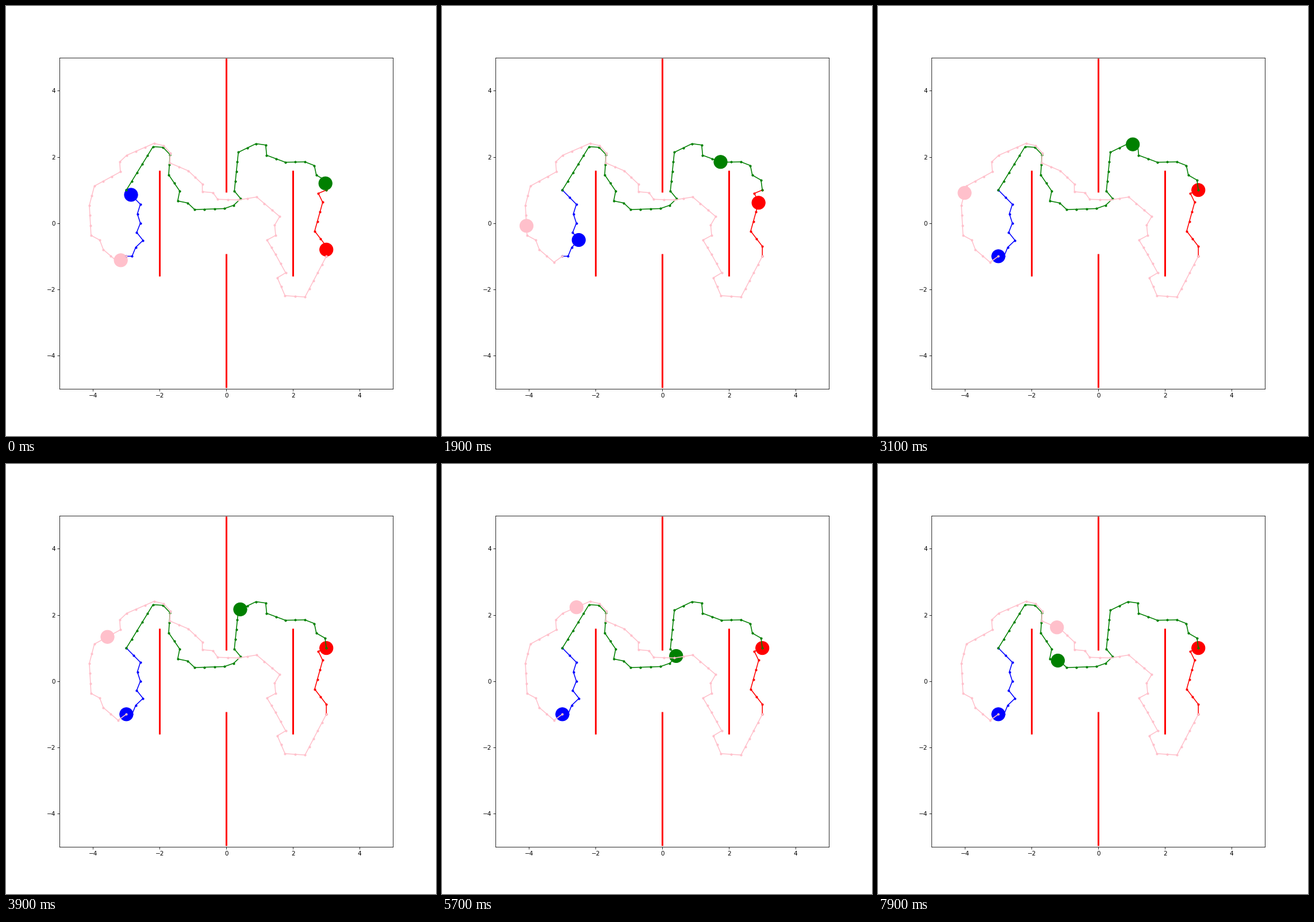
Recreate the animation shown at these times as a matplotlib script. Size 748 by 748 pixels, loop 8000 ms.

```python
import numpy as np
import matplotlib.pyplot as plt
from matplotlib.animation import FuncAnimation
from matplotlib.patches import Circle

INCHES, DPI = 10, 74.8
FRAMES, INTERVAL = 80, 100
STEP = .3    # spacing of waypoints along a route
START = .67  # progress at time zero, in waypoints

# Corners of each route; the straight legs are filled in by waypoints().
BLUE = [(-3, 1), (-2.58, .57), (-2.67, .28), (-2.58, 0), (-2.69, -.28),
        (-2.5, -.52), (-2.72, -.73), (-2.83, -1), (-3, -1)]

RED = [(3, -1), (3, -.7), (2.65, -.24), (2.89, .63), (2.76, .9), (3, 1)]

GREEN = [(3, 1), (2.96, 1.3), (2.7, 1.45), (2.64, 1.74), (2.36, 1.85),
         (1.77, 1.84), (1.21, 2.05), (1.18, 2.36), (.89, 2.4), (.36, 2.14),
         (.24, .97), (.43, .74), (.22, .54), (-.06, .44), (-.95, .41),
         (-1.16, .61), (-1.46, .67), (-1.4, .97), (-1.73, 1.46),
         (-1.69, 2.07), (-1.9, 2.29), (-2.2, 2.31), (-3, 1)]

PINK = [(-3, -1), (-3.25, -1.18), (-3.69, -.8), (-3.8, -.51), (-4.06, -.37),
        (-4.11, .54), (-3.96, 1.12), (-3.18, 1.55), (-3.2, 1.85),
        (-2.99, 2.05), (-2.17, 2.41), (-1.88, 2.34), (-1.68, 2.12),
        (-1.7, 1.82), (-1.14, 1.58), (-.72, 1.18), (-.72, .95), (-.4, .92),
        (-.26, .72), (.36, .7), (.91, .79), (1.6, .2), (1.45, -.06),
        (1.48, -.37), (1.22, -.51), (1.48, -.95), (1.78, -1.5),
        (1.53, -1.65), (1.76, -2.19), (2.36, -2.23), (3, -1)]


def waypoints(corners):
    """Split every leg into equal steps of about STEP."""
    corners = np.array(corners, float)
    pts = [corners[:1]]
    for a, b in zip(corners, corners[1:]):
        n = max(1, round(np.hypot(*(b - a)) / STEP))
        pts.append(np.linspace(a, b, n + 1)[1:])
    return np.vstack(pts)


class Robot:
    """Disc that runs along its route and stops at the end."""

    def __init__(self, ax, color, corners, speed):
        self.x, self.y = waypoints(corners).T
        self.speed = speed
        ax.plot(self.x, self.y, color=color, marker='.', ms=6, lw=1.5)
        self.disc = ax.add_patch(Circle(corners[0], .2, color=color))

    def move(self, k):
        u = START + self.speed * k
        i = np.arange(len(self.x))
        self.disc.center = np.interp(u, i, self.x), np.interp(u, i, self.y)
        return self.disc


def wall(ax, x, y0, y1):
    ax.plot([x, x], [y0, y1], color='red', lw=2.9, solid_capstyle='butt')


fig, ax = plt.subplots(figsize=(INCHES, INCHES), dpi=DPI)
fig.subplots_adjust(left=.1249)
ax.set(xlim=(-5, 5), ylim=(-5, 5),
       xticks=range(-4, 5, 2), yticks=range(-4, 5, 2))

for side in (-1, 1):
    wall(ax, 2 * side, -1.6, 1.6)
    wall(ax, 0, .93 * side, 4.97 * side)

robots = [Robot(ax, 'blue', BLUE, .278), Robot(ax, 'red', RED, .278),
          Robot(ax, 'green', GREEN, .285), Robot(ax, 'pink', PINK, .278)]


def update(k):
    return [r.move(k) for r in robots]


anim = FuncAnimation(fig, update, frames=FRAMES, interval=INTERVAL,
                     init_func=lambda: update(0), repeat=True, repeat_delay=0)
plt.show()
```
